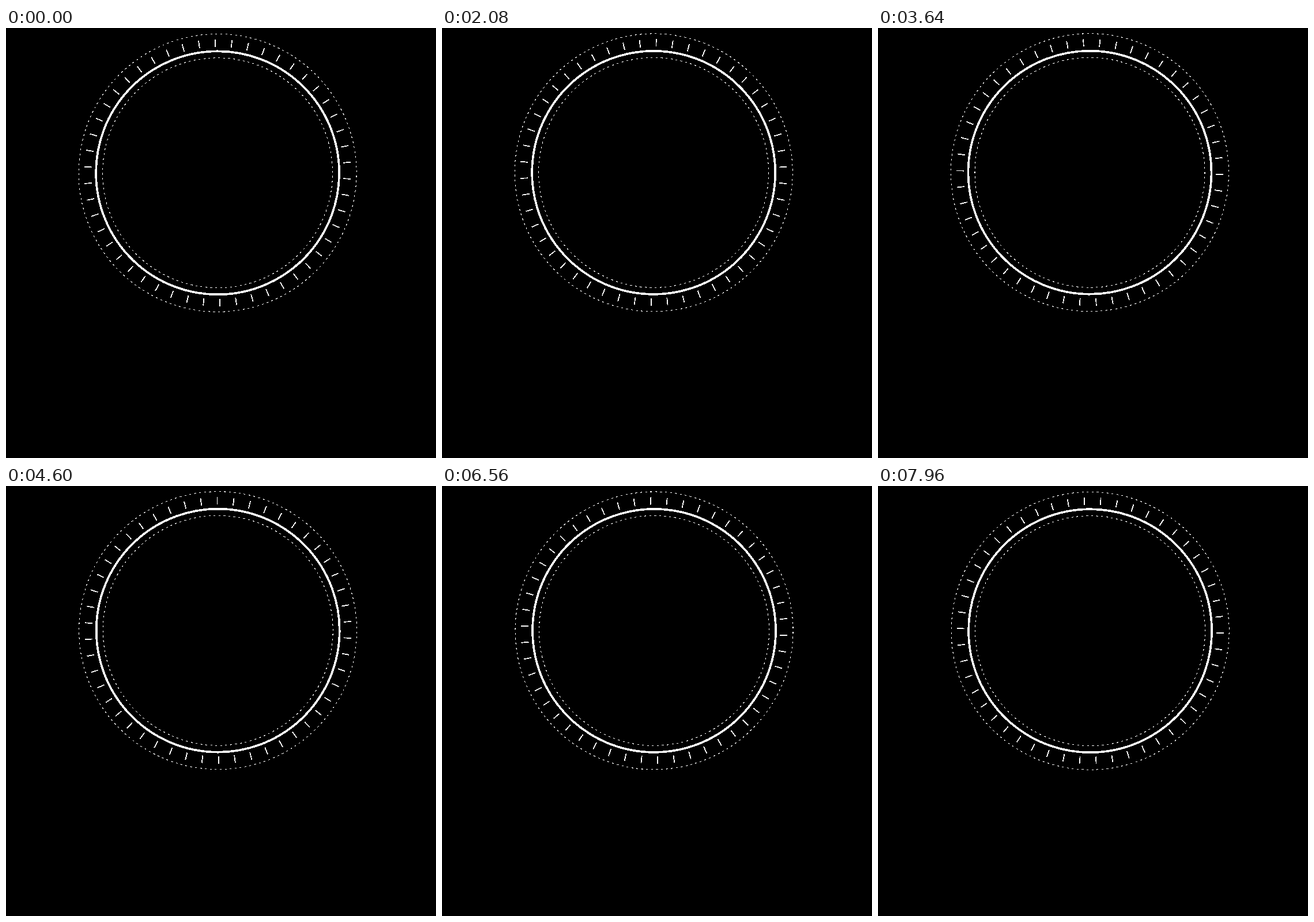
An HTML page that plays this animation: 746x746 px, repeating every 8 s.

```html
<!DOCTYPE html>
<html lang="en">
<head>
<meta charset="utf-8">
<title>Rotating dial</title>
<style>
  html, body { margin: 0; width: 100%; height: 100%; overflow: hidden; background: #000; }
  svg { display: block; width: 100vw; height: 100vh; }
</style>
</head>
<body>
<svg viewBox="0 0 746 746" fill="none" stroke="#fff" shape-rendering="crispEdges">
  <g id="dial"></g>
</svg>
<script>
const LOOP = 8000, STEP = 40;
const SPEED = 25.3, SLOWING = 0.022;   // degrees per second, and per second squared
const START = -1;
const PIVOT = [367.6, 251.2];
const OFFSET = [-0.5, 0.15];           // the dial sits slightly off its pivot
const TICKS = 50;

const dial = document.getElementById('dial');

function add(tag, attrs) {
  const el = document.createElementNS('http://www.w3.org/2000/svg', tag);
  for (const key in attrs) el.setAttribute(key, attrs[key]);
  dial.appendChild(el);
}

function ring(r, width, dash = 'none') {
  add('circle', { cx: 0, cy: 0, r, 'stroke-width': width, 'stroke-dasharray': dash });
}

// Fits a whole number of dashes around the ring
function dashedRing(r, dash, pitch) {
  const length = 2 * Math.PI * r;
  const fitted = length / Math.round(length / pitch);
  ring(r, 1.1, `${dash} ${fitted - dash}`);
}

dashedRing(241, 3.2, 8.6);
dashedRing(199.5, 3.2, 8.6);
ring(211, 3.7);
for (let i = 0; i < TICKS; i++) {
  add('line', {
    x1: 0, y1: -218.5, x2: 0, y2: -231.5,
    'stroke-width': 1.8,
    transform: `rotate(${i * 360 / TICKS})`
  });
}

function draw(ms) {
  const t = Math.floor((ms % LOOP) / STEP) * STEP / 1000;
  const turn = SPEED * t - SLOWING * t * t;
  dial.setAttribute('transform',
    `translate(${PIVOT}) rotate(${turn}) translate(${OFFSET}) rotate(${START})`);
}

let start;
function frame(now) {
  start ??= now;
  draw(now - start);
  requestAnimationFrame(frame);
}
draw(0);
requestAnimationFrame(frame);
</script>
</body>
</html>
```
